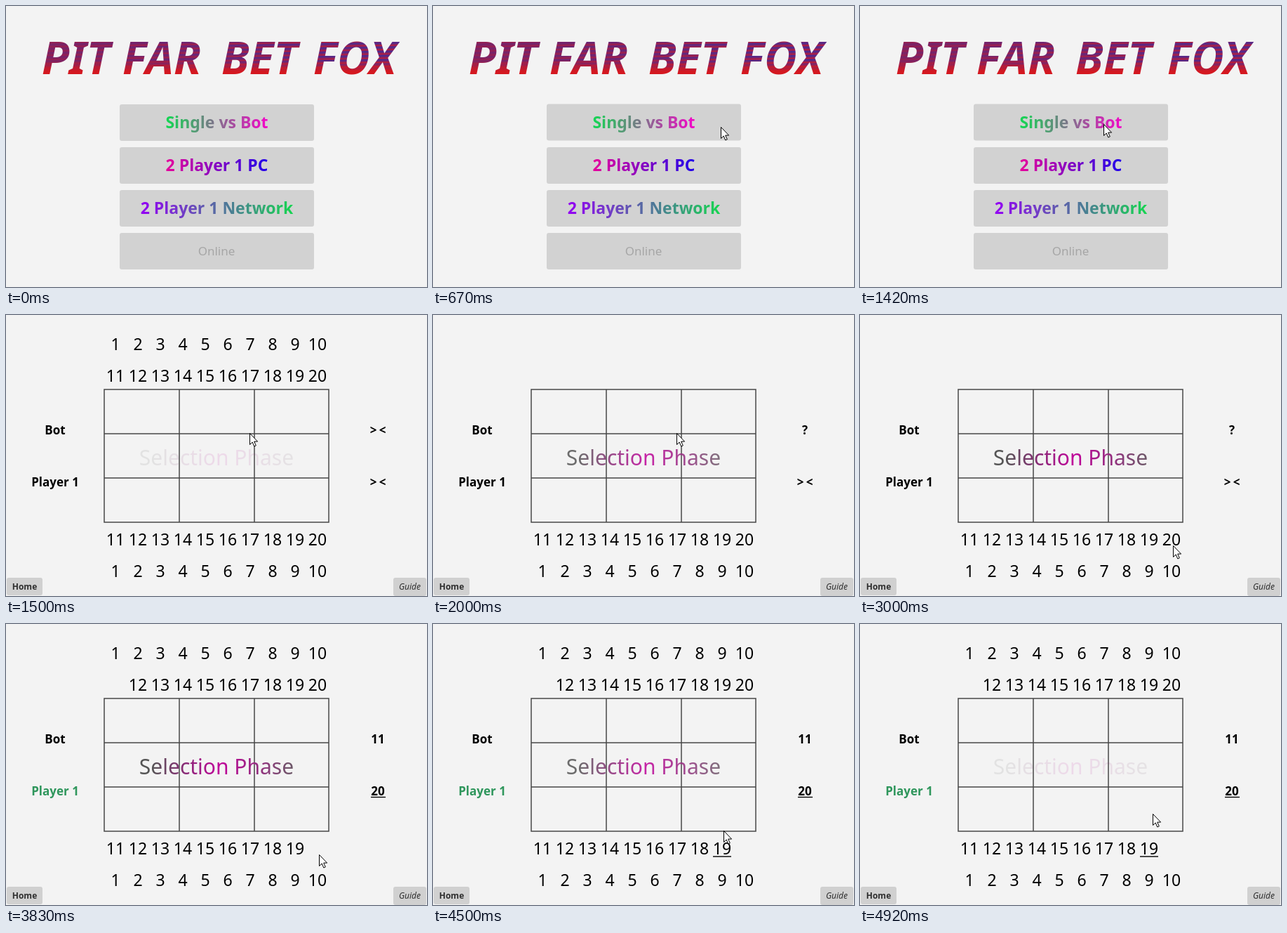
An HTML page that plays this animation: 600 by 400 pixels, repeating every 5.01 s.

```html
<!DOCTYPE html>
<html lang="en">
<head>
<meta charset="utf-8">
<title>Board game menu</title>
<style>
  html, body { margin: 0; width: 100%; height: 100%; overflow: hidden; background: #f3f3f3; }
  svg { display: block; width: 600px; height: 400px; }
  text { font-family: "Noto Sans", "Open Sans", sans-serif; }
  .mid { text-anchor: middle; }
  .bold { font-weight: 700; }
  .title { font-size: 64px; font-weight: 700; font-style: italic; }
  .option { font-size: 23px; }
  .number { font-size: 23px; }
  .label { font-size: 17px; }
  .small { font-size: 12px; fill: #303030; }
</style>
</head>
<body>
<svg viewBox="0 0 600 400">
  <defs>
    <linearGradient id="stripes" gradientUnits="userSpaceOnUse" x1="300" y1="50" x2="300.1" y2="56" spreadMethod="repeat">
      <stop offset="0" stop-color="#3a2ca0"/>
      <stop offset=".4" stop-color="#6a2878"/>
      <stop offset=".72" stop-color="#c81c30"/>
      <stop offset="1" stop-color="#4a2a94"/>
    </linearGradient>
    <linearGradient id="haze">
      <stop offset="0" stop-color="#8a2058" stop-opacity=".8"/>
      <stop offset="1" stop-color="#8a2058" stop-opacity=".1"/>
    </linearGradient>
    <linearGradient id="base" x2="0" y2="1">
      <stop offset=".58" stop-color="#d41820" stop-opacity="0"/>
      <stop offset=".86" stop-color="#d41820"/>
    </linearGradient>
    <linearGradient id="greenPink"><stop offset="0" stop-color="#12d852"/><stop offset="1" stop-color="#f405c8"/></linearGradient>
    <linearGradient id="pinkBlue"><stop offset="0" stop-color="#e6009c"/><stop offset="1" stop-color="#2000ea"/></linearGradient>
    <linearGradient id="violetGreen"><stop offset="0" stop-color="#9400f4"/><stop offset="1" stop-color="#16d650"/></linearGradient>
    <linearGradient id="phaseFill">
      <stop offset=".08" stop-color="#555555"/>
      <stop offset=".52" stop-color="#c0009a"/>
      <stop offset="1" stop-color="#6c5a68"/>
    </linearGradient>
    <clipPath id="titleShape">
      <text class="title" y="97"><tspan x="51">PIT</tspan><tspan x="166">FAR</tspan><tspan x="307">BET</tspan><tspan x="438">FOX</tspan></text>
    </clipPath>
  </defs>
  <rect width="600" height="400" fill="#f3f3f3"/>

  <g id="menu">
    <g clip-path="url(#titleShape)">
      <rect x="40" y="45" width="530" height="56" fill="url(#stripes)"/>
      <rect x="40" y="45" width="530" height="56" fill="url(#haze)"/>
      <rect x="40" y="45" width="530" height="56" fill="url(#base)"/>
    </g>
  </g>

  <g id="game">
    <path d="M140 106H460M140 169H460M140 232H460M140 295H460M140 106V295M247 106V295M354 106V295M460 106V295"
      stroke="#484848" stroke-width="1.5" stroke-linecap="square" fill="none"/>
    <text id="phase" class="mid" x="300" y="214" font-size="30" fill="url(#phaseFill)">Selection Phase</text>
    <g id="numbers"></g>
    <path id="hover19" d="M399 331H425" stroke="#000" stroke-width="1.4"/>
    <path id="hover20" d="M431 331H457" stroke="#000" stroke-width="1.4"/>
    <g class="label bold mid">
      <text x="70" y="170">Bot</text>
      <text id="player" x="70" y="244">Player 1</text>
      <text id="botPick" x="530" y="170"></text>
      <text id="playerPick" x="530" y="244">20</text>
      <text id="botOpen" y="170"><tspan x="523.5">&gt;</tspan><tspan x="536.5">&lt;</tspan></text>
      <text id="playerOpen" y="244"><tspan x="523.5">&gt;</tspan><tspan x="536.5">&lt;</tspan></text>
    </g>
    <path id="pickLine" d="M520 246.5H541" stroke="#000" stroke-width="1.4"/>
    <rect x="1" y="374" width="51" height="25" rx="3" fill="#d0d0d0"/>
    <text class="small bold mid" x="26.5" y="391">Home</text>
    <rect x="552" y="374" width="47" height="26" rx="3" fill="#d0d0d0"/>
    <text class="small mid" x="575.5" y="391" font-style="italic">Guide</text>
  </g>

  <path id="cursor" d="M.5 .5V16.5L4.2 13L6.8 19L9.3 17.9L6.7 12.1H11.6Z" fill="#fff" stroke="#000" stroke-width="1"/>
</svg>
<script>
const LOOP = 5010, STEPS = 60;
const $ = id => document.getElementById(id);

function add(parent, tag, attrs, label = "") {
  const el = document.createElementNS("http://www.w3.org/2000/svg", tag);
  for (const name in attrs) el.setAttribute(name, attrs[name]);
  el.textContent = label;
  parent.append(el);
  return el;
}

const show = (el, on) => el.setAttribute("visibility", on ? "visible" : "hidden");

const options = [
  ["Single vs Bot", "url(#greenPink)"],
  ["2 Player 1 PC", "url(#pinkBlue)"],
  ["2 Player 1 Network", "url(#violetGreen)"],
  ["Online", "#a6a6a6"]
].map(([label, fill], i) => {
  const y = 140 + 61 * i, button = add($("menu"), "g", {});
  add(button, "rect", { x: 162, y, width: 277, height: 52, rx: 3, fill: "#d2d2d2" });
  add(button, "text", i < 3
    ? { class: "option bold mid", x: 300.5, y: y + 34, fill }
    : { class: "mid", "font-size": 17, x: 300, y: y + 32, fill }, label);
  return button;
});

function numberRow(first, y) {
  return Array.from({ length: 10 }, (_, i) =>
    add($("numbers"), "text", { class: "number mid", x: 156 + 32 * i, y }, first + i));
}
const botNumbers = [...numberRow(1, 50), ...numberRow(11, 95)];
const playerNumbers = [...numberRow(11, 328), ...numberRow(1, 373)];

// Keys are [step, value, ...]; values between keys are linear.
function at(keys, step) {
  const next = keys.findIndex(key => key[0] > step);
  if (next === 0) return keys[0].slice(1);
  if (next < 0) return keys[keys.length - 1].slice(1);
  const a = keys[next - 1], b = keys[next], p = (step - a[0]) / (b[0] - a[0]);
  return a.slice(1).map((v, i) => v + (b[i + 1] - v) * p);
}

const cursorPath = [
  [5, 539, 230], [7, 426, 173], [12, 347, 168], [24, 347, 168], [26, 557, 373],
  [28, 477, 329], [32, 456, 328], [33, 456, 328], [36, 446, 328], [45, 446, 328],
  [48, 417, 318], [49, 417, 318], [52, 414, 306], [54, 414, 294], [56, 417, 274], [59, 417, 270]
];
const phaseFade = [[18, .1], [21, .55], [24, .85], [31, 1], [50, 1], [54, .85], [59, .1]];

const START = 18, BOT_READY = 20, HOVER = 38, REVEAL = 40;

function render(t) {
  const step = Math.floor((t + 4) * STEPS / 5004);
  const playing = step >= START, botReady = step >= BOT_READY, revealed = step >= REVEAL;
  $("menu").style.display = playing ? "none" : "";
  $("game").style.display = playing ? "" : "none";

  const [x, y] = at(cursorPath, step);
  $("cursor").setAttribute("transform", `translate(${Math.round(x)} ${Math.round(y)})`);
  show($("cursor"), step >= 5);
  const hovering = step >= 7;
  options[0].setAttribute("transform", `translate(0 ${hovering ? -.5 : 0})`);

  $("phase").setAttribute("opacity", at(phaseFade, step)[0]);
  botNumbers.forEach((el, i) => show(el, !botReady || revealed && i !== 10));
  show(playerNumbers[9], !revealed);
  show($("hover20"), step >= HOVER && !revealed);
  show($("hover19"), step >= 47);
  show($("botOpen"), !botReady);
  show($("playerOpen"), !revealed);
  show($("playerPick"), revealed);
  show($("pickLine"), revealed);
  $("botPick").textContent = revealed ? "11" : botReady ? "?" : "";
  $("player").setAttribute("fill", revealed ? "#2f965c" : "#000");
}

const startTime = performance.now();
function tick() {
  render((performance.now() - startTime) % LOOP);
  requestAnimationFrame(tick);
}
render(0);
requestAnimationFrame(tick);
</script>
</body>
</html>
```
